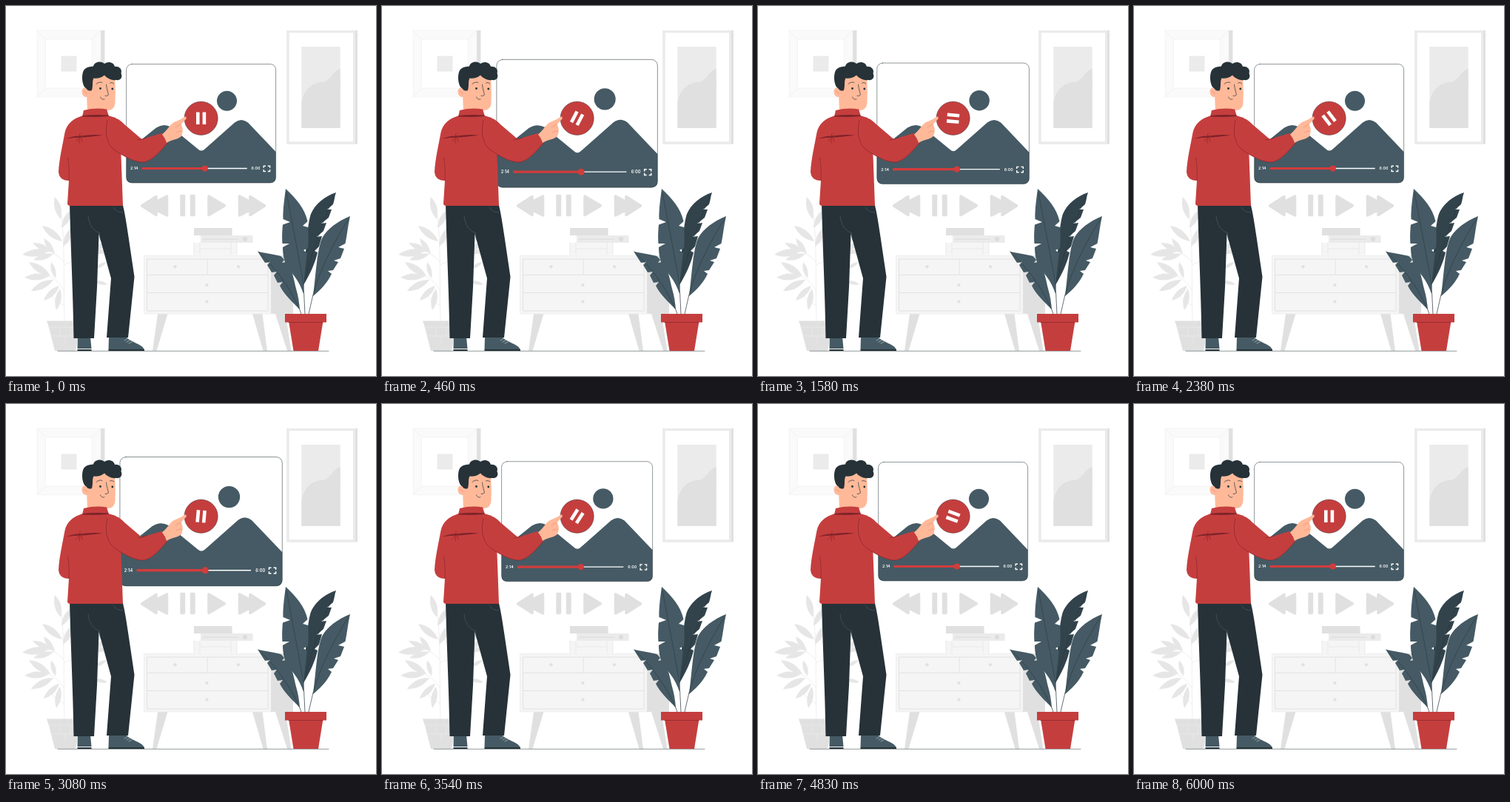
Write an HTML page that moves like this. It is 500 px wide and 500 px high and loops after 6.04 s.

```html
<!DOCTYPE html>
<html lang="en">
<head>
<meta charset="utf-8">
<title>Video player</title>
<style>
  html, body { margin: 0; width: 100%; height: 100%; overflow: hidden; background: #fff; }
  svg { display: block; width: 100vw; height: 100vh; }
  text { font: 600 5.2px Inter, "Open Sans", sans-serif; fill: #fff; }
  .line { fill: none; stroke: #263238; stroke-width: .7; stroke-linecap: round; stroke-linejoin: round; }
  .thin { stroke-width: .5; }
  .seam { stroke: #7d2329; stroke-width: .6; }
  .red { fill: #c53e3e; }
  .skin { fill: #ffb999; }
  .ink { fill: #263238; }
  .slate { fill: #455a64; }
</style>
</head>
<body>
<svg viewBox="0 0 500 500">
  <!-- wall pictures -->
  <g>
    <path fill="#e0e0e0" d="M127 33h6.500v90H127z"/>
    <path fill="#fafafa" stroke="#f0f0f0" stroke-width=".6" d="M42 33h86v90H42z"/>
    <path fill="none" stroke="#ececec" stroke-width=".7" d="M42 33l11.500 12M128 33l-11.500 12M42 123l11.500-12M128 123l-11.500-12"/>
    <path fill="#fff" stroke="#efefef" stroke-width=".7" d="M53.500 45h63v66h-63z"/>
    <path fill="#ebebeb" d="M74.500 67.500h21v21h-21z"/>
  </g>
  <g>
    <path fill="#e0e0e0" d="M379.500 33H475v153.500h-95.500z"/>
    <path fill="#ebebeb" d="M379.500 33H472v153.500h-92.500z"/>
    <path fill="#fff" d="M382.800 36.300H469v147h-86.200z"/>
    <path fill="#ebebeb" d="M399.300 55h52.400v109.700h-52.400z"/>
    <path fill="#e0e0e0" d="M399.300 132C402 114 412 104 426 103C440 102 440 88 451.700 85v79.700h-52.400z"/>
  </g>

  <!-- pale plant -->
  <g id="fern">
    <path fill="none" stroke="#ebebeb" stroke-width=".8" d="M79 426C77 380 81 320 73 268M78 345Q62 328 42 329M79 385Q68 365 48 362M78 405Q66 396 56 388M78 350Q110 335 135 325"/>
    <path fill="#e0e0e0" d="M55 425.500h46l-1 9-6 31.500H66l-8-31.500z"/>
    <path fill="none" stroke="#ebebeb" stroke-width=".7" d="M57 434h42M60 446h38M72 434l2 12M88 434l-1 12M80 446v10"/>
  </g>

  <!-- cabinet -->
  <g>
    <path fill="#e0e0e0" d="M205 416h13.500L203.500 466H198zM333 416h13.500L353 466h-5.500zM364 416h13.500L385.500 466H380zM357 337h31v79h-31z"/>
    <path fill="#f5f5f5" stroke="#ebebeb" stroke-width=".7" d="M186.500 337.300H358v78.700H186.500z"/>
    <path fill="none" stroke="#e2e2e2" d="M190.500 342h163.500v70H190.500zM190.500 363.300h163.500M190.500 387.500h163.500M272.200 342v21.300"/>
    <g fill="#e0e0e0">
      <circle cx="228.500" cy="352.300" r="2.100"/><circle cx="314" cy="352.300" r="2.100"/>
      <circle cx="271.500" cy="377" r="2.100"/><circle cx="271.500" cy="399.500" r="2.100"/>
    </g>
  </g>

  <!-- books -->
  <path fill="#e0e0e0" d="M254 300h51.500v10H254z"/>
  <path fill="#ebebeb" d="M263 310h70.500v10H263z"/>
  <path fill="#f5f5f5" d="M254 320h58v16.500h-58z"/>
  <path fill="none" stroke="#e6e6e6" stroke-width=".8" d="M254 320v16.500M262 320v16.500M304 320v16.500M312 320v16.500M262 328h42"/>
  <path fill="#e0e0e0" d="M266 314.500h48v1.500h-48z"/>
  <circle cx="323" cy="315" r="3" fill="#dcdcdc"/>

  <!-- player controls -->
  <g fill="#e0e0e0" stroke="#e0e0e0" stroke-width="3.500" stroke-linejoin="round">
    <path d="M183.500 270L203 257.500V264.500L217.500 257V283L203 275.500V282.500z"/>
    <path d="M237 256.500h3.500v26H237zM250.500 256.500h3.500v26h-3.500z"/>
    <path d="M274 257L295.500 269.800L274 282.500z"/>
    <path d="M349.500 270L330 257.500V264.500L315.500 257V283L330 275.500V282.500z"/>
  </g>

  <!-- video window -->
  <g id="screen">
    <rect x="162.600" y="78.500" width="202" height="160.500" rx="7.500" fill="#fff"/>
    <path class="slate" d="M162.600 197L203 164.500Q213 158 223 163.500L259 193Q264 198 269 193L309 157.500Q318 150.500 327 157.500L364.600 197V231.500Q364.600 239 357 239H170Q162.600 239 162.600 231.500z"/>
    <circle class="slate" cx="298.500" cy="128.200" r="13.500"/>
    <rect class="line thin" x="162.600" y="78.500" width="202" height="160.500" rx="7.500"/>
    <path stroke="#fff" stroke-width="1.300" d="M268 219.500h57.700"/>
    <path stroke="#d23c3c" stroke-width="3.200" d="M183.500 219.500h85"/>
    <circle cx="268.700" cy="219.500" r="4.100" fill="#d23c3c"/>
    <text x="168" y="221.400">2:14</text>
    <text x="331.500" y="221.400">6:00</text>
    <path fill="none" stroke="#fff" stroke-width="1.400" d="M351 216.300h-2.800v2.500M353.800 216.300h2.800v2.500M348.200 221v2.500h2.800M356.600 221v2.500h-2.800"/>
  </g>

  <path class="line thin" d="M70 466.300H436"/>

  <!-- button -->
  <circle class="red" cx="263.600" cy="151.800" r="22.700" stroke="#263238" stroke-width=".4"/>
  <g id="pause" fill="#fff">
    <path d="M257 143.600h4.600v16.400H257zM265.600 143.600h4.600v16.400h-4.600z"/>
  </g>

  <!-- man -->
  <g>
    <path class="slate" d="M97 447h17l1.500 16H96.500zM139 447H162C169 455 185 457 187 464.500H138.500z"/>
    <path class="ink" d="M96.500 464h19v2h-19zM138.500 464H187V466H138.500z"/>
    <path class="line" style="stroke:#cfd8dc;stroke-width:.6" d="M160 452l4-2M163 454l4-2M166 456l4-2"/>
    <path class="ink" d="M86 267H157.500C161 281 163 296 165.500 312L173.500 366L165 448H136L142 368L125.500 308L123 380L119 449H91.500C91 400 88 340 86 267z"/>
    <path class="line" style="stroke:#455a64" d="M111 284C112 296 118 304 127 307M126 307L127.500 316M145 272Q149 279 158 279"/>

    <!-- neck and head -->
    <path class="skin" d="M109 118L110 142Q122 147 138 141V134z"/>
    <path class="skin" d="M110 88H146C148 105 148 118 147.500 130C147 139 142 142 134 140.500C124 138 117 132 113 122C107 125 102 121 102.500 115C103 110 108 109 111 113z"/>
    <path class="ink" d="M108.500 111.500C103 109 101.500 95 104.500 88C107 83 112 82 118 81.500C119 75 129 73.500 133 78C138 74 146 76 147 82C153 81 157.500 86 155.500 91C158 96 155 101 149 100C143 101 137 98 133 93.500Q126 99 118.500 97.500C116 102 118 107 116 114Q111 116 108.500 111.500z"/>
    <path class="line" d="M122 105.500Q126 101.500 130 103.500M140.500 104Q143 102 146 105M135.500 106C136 112 138 117 138.500 120Q136 122.500 134 121.500M127.500 123Q129 127 133 126"/>
    <path class="line" style="stroke:#e88a70" d="M105 116Q108 114 109 119"/>
    <circle class="ink" cx="127.500" cy="111.500" r="1.400"/><circle class="ink" cx="143.800" cy="112" r="1.400"/>

    <!-- shirt -->
    <path class="red" d="M104 148C91 152 82 159 79.500 171C76 190 72 207 71 224C71.500 233 78 236 85 236L83 267Q83 270 87 270H158L155.500 202L148 151L138 148z"/>
    <path class="red" d="M105 141Q121 137 136 139.500L139 149Q121 151 103 149.500z"/>
    <path fill="#7d2329" d="M103.500 148Q121 146.500 138.500 147.500V149Q121 150.500 103.500 149.500zM81 179.500Q92 175 101 175.500Q116 173 131 174.500Q114 177 102 177.500Q92 177.500 81 179.500z"/>
    <path class="line seam" d="M100 172L99 185M101 177L103 183M99 177L95 183M85 236Q86 218 83.500 205"/>

    <!-- pointing arm -->
    <path class="skin" d="M208 175C217 171 220 161 227 157C233 155 238 152 242 149.500C245 150 244 153 241 155L236.500 160C240 166 239 171 237 176C232 181 224 180 217 185z"/>
    <path class="line" style="stroke:#e88a70;stroke-width:.6" d="M236.500 160Q233 161 229 164M237 169Q233 169 230 171"/>
    <path class="red" d="M138 151C148 149 154 154 160 160L183.500 180L210 172Q215 178 217.500 186C207 198 198 209 187 211C173 212 158 202 145 194C135 186 132 166 138 151z"/>
    <path class="line seam" d="M137 155C133 169 136 187 146 194C159 203 174 212 187 211C198 208 207 198 217.500 186M184 180L190 178M184 180L178 181"/>
  </g>

  <!-- potted plant -->
  <g>
    <path class="line" d="M402 376L404 416M415 390L409 416M396 408L399 416"/>
    <path fill="#32434c" d="M446 252C431 257 418 267 412 281C407 296 405 330 402 377C411 362 418 347 421 333L417 331L423 325L427 311L420 312L429 304L433 293L426 294L436 286L440 275L434 275L442 268C444 262 444 257 446 252z"/>
    <path class="slate" d="M378 247C376 262 374 276 374.500 288L384 292L374 295.500C373 306 373 314 373.500 321L383 321L374 326C374 336 376 345 379 351C386 361 396 370 402 389C402 372 405 350 407 334L402 330L408 327C409 317 409 308 408 299L401 297L407.500 291C404 274 392 260 378 247z"/>
    <path class="slate" d="M465 284C448 291 434 301 427 314C420 331 419 362 415 392C425 384 435 373 440 362L435 358L442 357L449 346L443 344L452 341L457 328L449 326L458.500 321C461 309 462 297 465 284z"/>
    <path class="slate" d="M340 331.500C352 335 363 335 372 338.500L376 343L373 347L379 346C387 355 389 370 392 382C395 392 396 400 397 410C387 400 376 390 370 378L374 373L367 374L362 364L366 359L359 360L353 350L357 346L350 347C346 341 343 336 340 331.500z"/>
    <path class="line thin" d="M379 252C386 290 395 335 402 376M462 289C443 320 425 354 415 390M343 334C364 354 384 380 396 409"/>
    <path class="line thin" style="stroke:#263238" d="M443 257C427 293 413 335 403 374"/>
    <path class="red" d="M382 426H428.500L422 466H388.500z"/>
    <path class="red" d="M377 416h56v11.500h-56z"/>
    <path class="line seam" d="M382 427.500H428"/>
  </g>
</svg>
<script>
  const $ = id => document.getElementById(id);

  // Leaves of the pale plant: base x, y, tip x, y
  const leaves = [
    [74, 288, 66, 258], [75, 300, 89, 275], [76, 318, 49, 297], [77, 325, 91, 298],
    [62, 332, 36, 320], [58, 331, 22, 336], [66, 335, 51, 314], [64, 335, 37, 343],
    [67, 368, 61, 346], [60, 365, 31, 346], [58, 365, 25, 367], [64, 370, 34, 385],
    [72, 378, 51, 398], [73, 382, 68, 411], [116, 333, 137, 318], [118, 334, 140, 330],
    [120, 355, 136, 346], [119, 372, 137, 376]
  ];
  const PLUMP = .27;
  for (const [x, y, tx, ty] of leaves) {
    const mx = (x + tx) / 2, my = (y + ty) / 2;
    const nx = (ty - y) * PLUMP, ny = (x - tx) * PLUMP;
    const leaf = document.createElementNS("http://www.w3.org/2000/svg", "path");
    leaf.setAttribute("d", `M${x} ${y}Q${mx + nx} ${my + ny} ${tx} ${ty}Q${mx - nx} ${my - ny} ${x} ${y}`);
    leaf.setAttribute("fill", "#e6e6e6");
    $("fern").append(leaf);
  }

  const LOOP = 6040, TURN = 6000, FPS = 24;
  // Heartbeat: time in ms, scale
  const beat = [[0, 1], [600, 1.1], [1800, 1], [2400, 1], [3000, 1.1], [3600, 1], [6000, 1]];

  function scaleAt(t) {
    const i = Math.max(1, beat.findIndex(([time]) => t <= time));
    const [t0, s0] = beat[i - 1], [t1, s1] = beat[i];
    return s0 + (s1 - s0) * (t - t0) / (t1 - t0);
  }

  function draw(now) {
    const step = Math.floor((now % LOOP + 5.5) * FPS / 1000);
    const t = Math.min(TURN, step * 1000 / FPS);
    $("screen").setAttribute("transform",
      `translate(263.6 158.7) scale(${scaleAt(t)}) translate(-263.6 -158.7)`);
    $("pause").setAttribute("transform", `rotate(${t / TURN * 360} 263.6 151.8)`);
  }

  const start = performance.now();
  function tick() {
    draw(performance.now() - start);
    requestAnimationFrame(tick);
  }
  tick();
</script>
</body>
</html>
```
